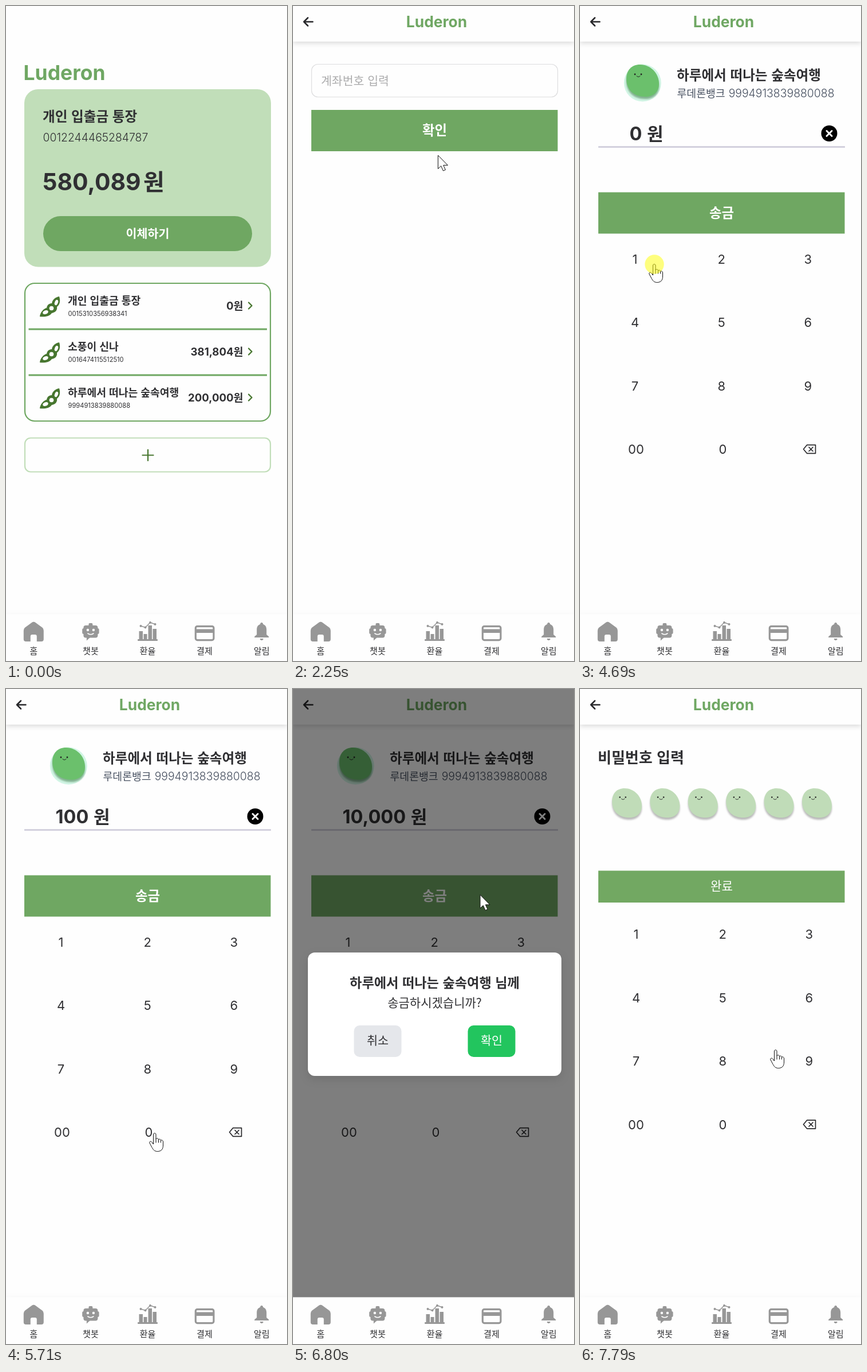
These frames come from a looping animation (491x1141 px, 8 s). An HTML page:

```html
<!DOCTYPE html>
<html lang="ko">
<head>
<meta charset="utf-8">
<style>
html, body { margin: 0; width: 100%; height: 100%; overflow: hidden; background: #fefefe; }
svg { display: block; width: 491px; height: 1141px; }
text { fill: #303033; white-space: pre; }
.ko { font-family: "Noto Sans CJK KR", "Noto Sans CJK", "Noto Sans KR", sans-serif; }
.num { font-family: Inter, Roboto, sans-serif; }
.bold { font-weight: 700; }
.ko.bold { font-weight: 600; }
.light { font-weight: 300; }
.white { fill: #fff; }
.brand { fill: #6fa763; }
.slate { fill: #475060; }
.faint { fill: #acacad; }
.line { fill: none; stroke-linecap: round; stroke-linejoin: round; }
.bar { filter: drop-shadow(0 3px 4px rgba(0, 0, 0, .14)); }
.nav { filter: drop-shadow(0 -2px 4px rgba(0, 0, 0, .025)); }
.box { filter: drop-shadow(0 6px 8px rgba(0, 0, 0, .1)); }
</style>
</head>
<body>
<svg id="stage" viewBox="0 0 491 1141" xmlns="http://www.w3.org/2000/svg"></svg>
<script>
const LOOP = 8000;
const GREEN = '#6fa762', PALE = '#c1deb9', DARK = '#47762f', GRAY = '#979797', INK = '#28282b';
const BRAND = 'Luderon', BANK = '루데론뱅크';
const TRIP = '하루에서 떠나는 숲속여행', ACCOUNT = '9994913839880088';

// Markup helpers
const text = (x, y, size, cls, body, anchor = 'start') =>
  `<text x="${x}" y="${y}" font-size="${size}" class="${cls}" text-anchor="${anchor}">${body}</text>`;
const mid = (x, y, size, cls, body) => text(x, y, size, cls, body, 'middle');
const rect = (x, y, w, h, r, fill, extra = '') =>
  `<rect x="${x}" y="${y}" width="${w}" height="${h}" rx="${r}" fill="${fill}" ${extra}/>`;
const line = (d, color, width) => `<path class="line" d="${d}" stroke="${color}" stroke-width="${width}"/>`;
const fill = (d, color, extra = '') => `<path d="${d}" fill="${color}" ${extra}/>`;
const dot = (x, y, r, color) => `<circle cx="${x}" cy="${y}" r="${r}" fill="${color}"/>`;
const at = (x, y, body, scale = 1) => `<g transform="translate(${x} ${y}) scale(${scale})">${body}</g>`;
const group = (id, body) => `<g id="${id}">${body}</g>`;

const defs = `<defs>
  <filter id="soft" x="-30%" y="-30%" width="160%" height="160%"><feGaussianBlur stdDeviation="1.8"/></filter>
  <filter id="rim" x="-20%" y="-20%" width="140%" height="140%"><feGaussianBlur stdDeviation=".7"/></filter>
  <path id="blob" d="M24 0C42 0 57 15 57 33.5C57 48 47 56 33 56C13 56 0 44 0 25C0 10 9 0 24 0Z"/>
</defs>`;

const bean = (color, shadow, opacity) =>
  `<use href="#blob" y="4" fill="${shadow}" opacity="${opacity}" filter="url(#soft)"/>
   <use href="#blob" fill="${color}"/>` +
  dot(15, 17, 1.4, '#222') + dot(26, 17, 1.4, '#222') + line('M18 20Q21 23 24 20', '#222', 1);

const pod = fill('M0 35C1 27 7 21 12 20C13 14 17 12 21 12C22 5 28 1 34 0C36 6 36 14 30 18C31 24 27 28 21 29C17 35 8 36 0 35Z', DARK) +
  `<ellipse cx="10" cy="27.5" rx="5" ry="3.3" fill="#fff" transform="rotate(-20 10 27.5)"/>` +
  dot(20.5, 20.5, 3.8, '#fff') +
  `<ellipse cx="29" cy="10.5" rx="2.8" ry="4.8" fill="#fff" transform="rotate(22 29 10.5)"/>`;

const won = (size, gap = '') => `<tspan class="ko" font-size="${size}">${gap}원</tspan>`;

const row = (y, name, number, amount) =>
  at(59, y - 17, pod) +
  text(108, y - 3, 18.2, 'ko bold', name) +
  text(108.5, y + 17, 11.15, 'num', number) +
  text(414.5, y + 6, 18.6, 'num bold', amount + won(18.4), 'end') +
  line(`M424 ${y - 6.5}l5.5 5.5l-5.5 5.5`, DARK, 2.3);

const home = text(30.5, 129, 35.5, 'num bold brand', BRAND) +
  rect(32, 145, 431, 309.5, 24, PALE) +
  text(64, 201, 23.6, 'ko bold', '개인 입출금 통장') +
  text(64.5, 236, 19.4, 'num light', '0012244465284787') +
  text(64, 321, 40.9, 'num bold', '580,089') + text(240, 321, 40, 'ko bold', '원') +
  rect(65, 366, 365, 61, 30.5, GREEN) + mid(247.5, 404, 20.6, 'ko bold white', '이체하기') +
  rect(33, 483, 429, 240, 17, 'none', `stroke="${GREEN}" stroke-width="2.2"`) +
  rect(39.5, 561.5, 416.5, 3, 0, GREEN) + rect(39.5, 641.5, 416.5, 3, 0, GREEN) +
  row(523, '개인 입출금 통장', '0015310356938341', '0') +
  row(603, '소풍이 신나', '0016474115512510', '381,804') +
  row(683, TRIP, ACCOUNT, '200,000') +
  rect(33, 752.5, 429, 59, 10, 'none', `stroke="${PALE}" stroke-width="2.2"`) +
  line('M238.5 782.5H257.5M248 773V792', DARK, 2.2);

const header = rect(0, 0, 491, 62, 0, '#fefefe', 'class="bar"') +
  line('M34.5 27.5H19M26 20.5L19 27.5L26 34.5', INK, 2.5) +
  mid(251, 36.5, 26.4, 'num bold brand', BRAND);

const keypad = (x, y) => {
  let out = '';
  for (let i = 0; i < 9; i++)
    out += mid(x + 151.2 * (i % 3), y + 8 + 110.5 * Math.floor(i / 3), 22, 'num', i + 1);
  const low = y + 331.5;
  return out + mid(98, low + 8, 22, 'num', '00') + mid(249.5, low + 8, 22, 'num', '0') +
    at(401, low, line('M-4.5 -7.3H10.5V7.3H-4.5L-10.5 0ZM-1 -3.5L6 3.5M6 -3.5L-1 3.5', INK, 1.7));
};

const receiver = header +
  rect(32.5, 101.5, 430, 57, 11, '#fefefe', 'id="field" stroke-width="1.2"') +
  group('hint', text(49, 138, 20.5, 'ko faint', '계좌번호 입력')) +
  group('typed', text(49, 138, 22.3, 'num', ACCOUNT)) +
  rect(32, 181, 430.5, 72, 0, GREEN) + mid(247.5, 225, 23.4, 'ko bold white', '확인');

const transfer = header +
  `<circle cx="109.3" cy="134" r="32.5" fill="#d2f5e5" filter="url(#rim)"/>` +
  at(81, 102, bean('#6bc06c', '#3f7a48', .55)) +
  text(169, 129, 23.6, 'ko bold', TRIP) +
  text(169.5, 159, 18.3, 'ko light slate', BANK) +
  text(444.5, 159, 19.4, 'num light slate', ACCOUNT, 'end') +
  `<text x="86.5" y="234" font-size="32.5" class="num bold"><tspan id="amount"></tspan>${won(31, ' ')}</text>` +
  rect(32, 244, 431, 3, 0, '#d3d1de') +
  dot(435.5, 222, 14, '#000') + line('M431 217.5l9 9M440 217.5l-9 9', '#fff', 3) +
  rect(32, 324.5, 430.5, 72, 0, GREEN) + mid(247.5, 369, 23.4, 'ko bold white', '송금') +
  keypad(96, 440.5);

const dialog = rect(0, 0, 491, 1060, 0, '#000', 'opacity=".5"') +
  rect(26, 459, 443, 215, 12, '#fff', 'class="box"') +
  mid(247.5, 520, 23.2, 'ko bold', TRIP + ' 님께') +
  mid(247.5, 554, 21, 'ko', '송금하시겠습니까?') +
  rect(106.5, 586, 83, 55, 10, '#e5e7eb') + mid(148, 620, 20.7, 'ko', '취소') +
  rect(305.5, 586, 83, 55, 10, '#22c55e') + mid(347, 620, 20.7, 'ko white', '확인');

let pin = header + text(31, 129, 26, 'ko bold', '비밀번호 입력');
for (let i = 0; i < 6; i++) pin += at(56 + 66.4 * i, 173, bean('#c0dcb8', '#777', .5), .912);
pin += rect(32, 316.5, 430.5, 55.5, 0, '#72a862') + mid(247.5, 351, 21.2, 'ko white', '완료') + keypad(98, 427);

const icons = {
  홈: fill('M-15.5 -6Q-17.5 -4 -17.5 -1V14Q-17.5 18 -13.5 18H-5.5V9Q-5.5 6 -2.5 6H2.5Q5.5 6 5.5 9V18H13.5Q17.5 18 17.5 14V-1Q17.5 -4 15.5 -6L2.5 -15.5Q0 -17 -2.5 -15.5Z', GRAY),
  챗봇: rect(-12.5, -10, 25, 21.5, 4, GRAY) + rect(-14.7, -5, 29.4, 10, 2.5, GRAY) + rect(-3.5, -14, 7, 7, 2, GRAY) +
    fill('M-7 10V16.5L0 10Z', GRAY) + dot(-5, -2, 2.2, '#fff') + dot(5, -2, 2.2, '#fff') + line('M-5 4Q0 7.5 5 4', '#fff', 1.6),
  환율: rect(-17.5, 14, 35, 3, 1, GRAY) + rect(-15, 0, 6.5, 15, 0, GRAY) + rect(-7, 5, 6, 10, 0, GRAY) +
    rect(1, -10, 6.5, 25, 0, GRAY) + rect(9, -4, 6.5, 19, 0, GRAY) + line('M-12 -9L-4 -6.5L4.5 -15L13 -12', GRAY, 1.6) +
    dot(-12, -9, 2, GRAY) + dot(-4, -6.5, 2, GRAY) + dot(4.5, -15, 2, GRAY) + dot(13, -12, 2, GRAY),
  결제: rect(-15.8, -8.4, 31.6, 24, 3, 'none', `stroke="${GRAY}" stroke-width="3.2"`) + rect(-16, -3.5, 32, 6.5, 0, GRAY),
  알림: fill('M-12.5 11V9.5L-8.5 6V-3C-8.5 -8 -6 -11 -2.5 -12V-12.5C-2.5 -16 2.5 -16 2.5 -12.5V-12C6 -11 8.5 -8 8.5 -3V6L12.5 9.5V11ZM-3 13H3C3 17 -3 17 -3 13Z', GRAY),
};
const nav = rect(0, 1059.5, 491, 82, 0, '#fefefe', 'class="nav"') +
  Object.entries(icons).map(([label, icon], i) =>
    at(48.3 + 99.6 * i, 1089, icon) + mid(48.3 + 99.6 * i, 1128.5, 15.2, 'ko', label)).join('');

const outline = 'stroke="#111" stroke-width="1" stroke-linejoin="round"';
const cursors =
  group('hand', fill('M-2.5 2C-2.5 -1 2 -1 2 2V10C3 8 6.5 8.5 6.5 11C8 9.5 10.5 10 10.5 12.5C12 11 14.5 12 14.5 15V21C14.5 28 11 31.5 4.5 31.5C-1 31.5 -3 28 -5 24.5L-9 17C-10 14 -6.5 13 -5 15.5L-2.5 19Z', '#fff', outline) +
    line('M2 10V16M6.5 11V16M10.5 12.5V16', '#111', 1)) +
  group('arrow', fill('M0 0V23.5L5.3 18.6L9 27L13 25.3L9.4 17.3H17Z', '#fff', outline)) +
  group('beam', line('M-3.5 -10H3.5M0 -10V10M-3.5 10H3.5', '#222', 1.3)) +
  group('press', dot(0, 0, 16.7, 'rgba(255,255,0,.5)'));

document.getElementById('stage').innerHTML = defs +
  group('home', home) + group('receiver', receiver) + group('transfer', transfer) +
  group('dialog', dialog) + group('pin', pin) + nav + group('cursor', cursors);

// Timeline
const pages = [[0, 'home'], [1640, 'receiver'], [3600, 'transfer'], [6800, 'dialog'], [7790, 'pin']];
const amounts = [[0, '0'], [4760, '1'], [5450, '10'], [5710, '100'], [5900, '1,000'], [6110, '10,000']];
const presses = [[1450, 1640], [2590, 2720], [3470, 3600], [4690, 4760], [5320, 5450],
  [5580, 5710], [5860, 5900], [6050, 6110], [6710, 6800], [7610, 7790]];
const path = [[420, 440, 711], [1230, 257, 413], [1310, 259, 409.5], [1850, 259, 409.5], [2590, 249, 143],
  [2920, 249, 143], [3420, 247, 192], [3880, 247, 192], [4350, 128, 477], [4490, 130, 450], [4760, 130, 450],
  [5150, 316, 802], [5320, 260, 774], [6110, 260, 774], [6640, 327, 358.5], [7050, 327, 358.5], [7460, 342, 629]];

const latest = (list, t) => list.filter(([start]) => start <= t).pop()[1];
const ease = p => p * p * (3 - 2 * p);
const within = (v, a, b) => v >= a && v <= b;

function position(t) {
  const i = path.findIndex(([time]) => time > t);
  if (i < 0) return path[path.length - 1].slice(1);
  if (i === 0) return path[0].slice(1);
  const [t0, x0, y0] = path[i - 1], [t1, x1, y1] = path[i];
  const p = ease((t - t0) / (t1 - t0));
  return [x0 + (x1 - x0) * p, y0 + (y1 - y0) * p];
}

function cursorKind(page, x, y) {
  if (page === 'receiver' && within(y, 101, 158)) return 'beam';
  const clickable = {
    home: within(y, 366, 427) || y > 483,
    receiver: within(y, 181, 253),
    transfer: y > 397,
    dialog: within(x, 305, 389) && within(y, 586, 641),
    pin: true,
  };
  return clickable[page] ? 'hand' : 'arrow';
}

const el = id => document.getElementById(id);
const show = (id, on) => el(id).setAttribute('display', on ? 'inline' : 'none');

function render(t) {
  const page = latest(pages, t);
  for (const [, id] of pages) show(id, id === page);
  if (page === 'dialog') show('transfer', true);
  el('amount').textContent = latest(amounts, t);
  show('hint', t < 2920);
  show('typed', t >= 2920);
  el('field').setAttribute('stroke', within(t, 2590, 3419) ? GREEN : '#dededf');

  const [x, y] = position(t);
  const kind = cursorKind(page, x, y);
  for (const id of ['hand', 'arrow', 'beam']) show(id, id === kind);
  show('press', presses.some(([a, b]) => t >= a && t < b));
  show('cursor', t >= 470);
  el('cursor').setAttribute('transform', `translate(${x} ${y})`);
}

let begin;
function tick(now) {
  begin ??= now;
  render((now - begin) % LOOP);
  requestAnimationFrame(tick);
}
render(0);
requestAnimationFrame(tick);
</script>
</body>
</html>
```
